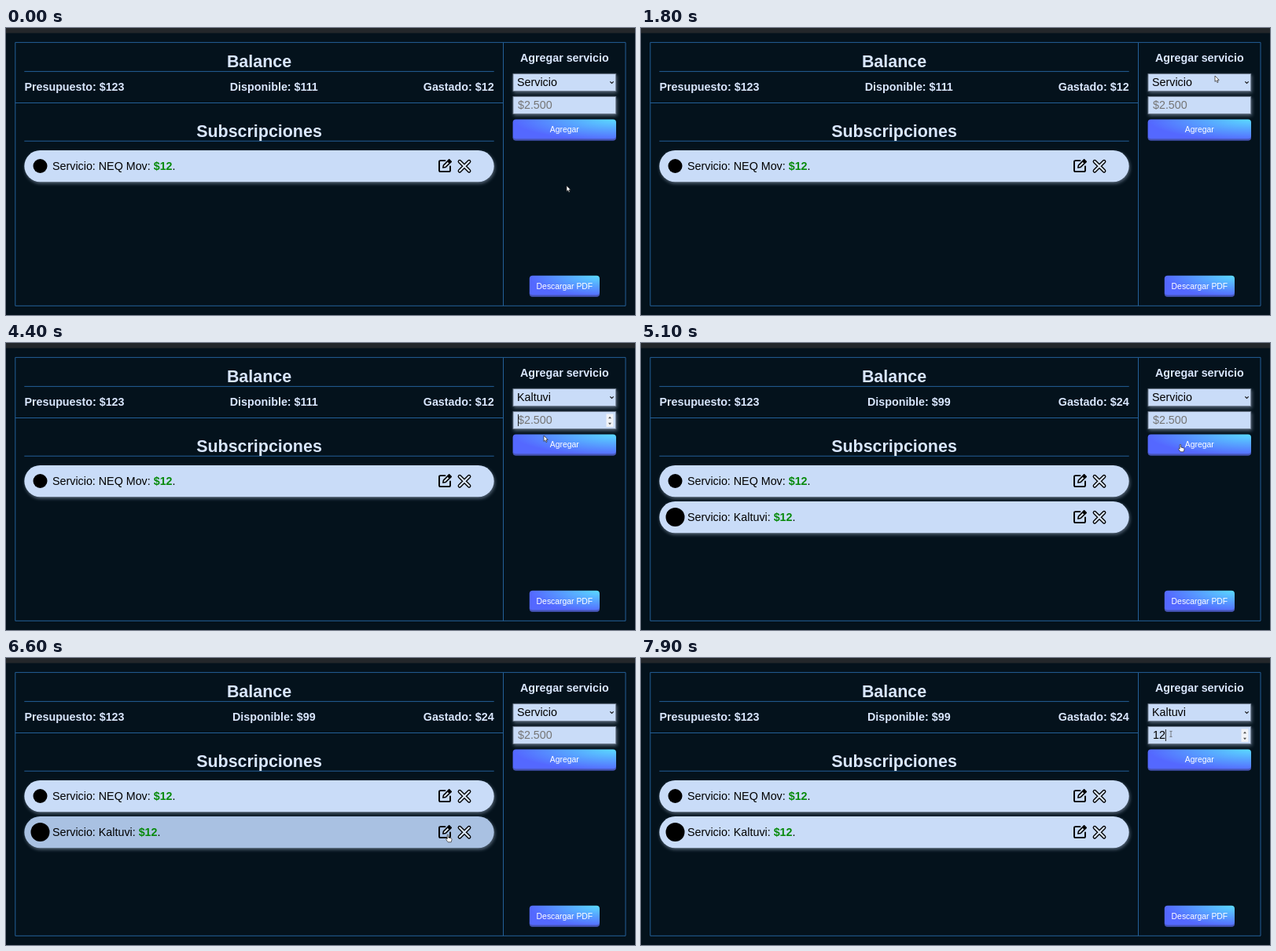
Recreate the animation shown at these times as an HTML page. Size 800 by 366 pixels, loop 8 s.

```html
<!DOCTYPE html>
<html lang="es">
<head>
<meta charset="utf-8">
<title>Subscripciones</title>
<style>
  html, body { margin: 0; width: 100%; height: 100%; overflow: hidden; background: #04121c; }
  svg { display: block; width: 800px; height: 366px; }
  text { font: 14.3px "Liberation Sans", Arial, sans-serif; white-space: pre; }
  .light { fill: #d9e6fd; font-weight: bold; }
  .title { font-size: 21.45px; text-anchor: middle; }
  .mid { text-anchor: middle; }
  .end { text-anchor: end; }
  .line { fill: none; stroke: #235f98; }
  .glow { filter: drop-shadow(1px 2px 2px rgba(201, 220, 248, .42)); }
  .price { fill: #078a0b; font-weight: bold; }
  .button text { font-size: 10.4px; fill: #fff; text-anchor: middle; }
</style>
</head>
<body>
<svg viewBox="0 0 800 366">
  <defs>
    <radialGradient id="blue" cx="1" cy="0" r="1">
      <stop stop-color="#5adaff"/><stop offset="1" stop-color="#5468ff"/>
    </radialGradient>
    <g id="edit" fill="none" stroke="#000" stroke-linecap="round" stroke-linejoin="round">
      <path d="M8.5 2.6H2.6Q1 2.6 1 4.2V15Q1 16.6 2.6 16.6H13.4Q15 16.6 15 15V10" stroke-width="1.9"/>
      <path d="M5.8 11.6L6.4 8.6L13.6 1.4L16.2 4L9 11.1Z" fill="#dbe7fa" stroke-width="1.5"/>
      <path d="M11.6 3.4L14.2 6L16.2 4L13.6 1.4Z" fill="#000" stroke-width="1.2"/>
    </g>
  </defs>
  <rect width="800" height="366" fill="#04121c"/>
  <rect width="800" height="6.5" fill="#23272b"/>
  <path class="line" d="M11.8 18.4H788V354.3H11.8ZM632.5 18.4V354.3M11.8 95.5H632.5M23.3 55.4H620.7M23.3 144.2H620.7"/>

  <text class="light title" x="322" y="49.6">Balance</text>
  <text class="light" x="23.4" y="80">Presupuesto: $123</text>
  <text class="light mid" x="340.8" y="80" id="available"></text>
  <text class="light end" x="620.6" y="80" id="spent"></text>
  <text class="light title" x="322" y="138.6">Subscripciones</text>
  <g id="rows"></g>

  <text class="light mid" x="710.3" y="42.7">Agregar servicio</text>
  <g class="glow" fill="#c9dcf8" stroke="#6f7b8d" stroke-width=".9">
    <rect x="645" y="58.4" width="130.7" height="22"/>
    <rect x="645" y="87.4" width="130.7" height="22"/>
  </g>
  <text x="650" y="74.3" id="service"></text>
  <path d="M768.3 68.3l2.2 2.2 2.2-2.2" fill="none" stroke="#111" stroke-width="1.1"/>
  <text x="651" y="103.2" id="amount"></text>
  <g id="spinner">
    <rect x="763.5" y="90.5" width="9" height="16.5" fill="#f1f3f7"/>
    <path d="M766 96.2l2-2.4 2 2.4zM766 101.8l2 2.4 2-2.4z" fill="#505050"/>
  </g>
  <path id="caret" d="M0 91V106" stroke="#111" stroke-width=".9"/>
  <g id="buttons"></g>
  <g id="cursor" stroke-linejoin="round"></g>
</svg>
<script>
const $ = id => document.getElementById(id);
const LOOP = 8000, STEP = 100;
const ADDED = 5000;

const services = [
  { name: "NEQ Mov", y: 156, mark: 9 },
  { name: "Kaltuvi", y: 202, mark: 12 },
];

$("rows").innerHTML = services.map(({ name, y, mark }) => `
  <g>
    <rect class="glow" x="23.3" y="${y}" width="597.4" height="40.2" rx="20.1"/>
    <circle cx="43.5" cy="${y + 20}" r="${mark}"/>
    <text x="59" y="${y + 24.8}">Servicio: ${name}: <tspan class="price">$12</tspan>.</text>
    <use href="#edit" x="550" y="${y + 10.5}"/>
    <g transform="translate(583 ${y + 20.3})" stroke-linecap="round">
      <path d="M-6 -6L6 6M6 -6L-6 6" stroke="#000" stroke-width="4.8"/>
      <path d="M-6 -6L6 6M6 -6L-6 6" stroke="#dbe7fa" stroke-width="2.2"/>
    </g>
  </g>`).join("");

function button(x, y, w, label) {
  const h = 27, r = 4, b = y + h, right = x + w;
  return `<g class="button">
    <rect x="${x}" y="${y}" width="${w}" height="${h}" rx="${r}" fill="url(#blue)"/>
    <path fill="#3a416f" fill-opacity=".5" d="M${x} ${b - r}a${r} ${r} 0 0 0 ${r} ${r}H${right - r}
      a${r} ${r} 0 0 0 ${r} ${-r}v-2.2a${r} ${r} 0 0 1 ${-r} ${r}H${x + r}a${r} ${r} 0 0 1 ${-r} ${-r}z"/>
    <text x="${x + w / 2}" y="${y + 16.8}">${label}</text>
  </g>`;
}
$("buttons").innerHTML = button(644.6, 116.5, 131.4, "Agregar") + button(665.8, 315.8, 89.2, "Descargar PDF");

const cursors = {
  arrow: `<path d="M0 0V7.4L1.7 5.9L2.9 8.6L4.2 8L3 5.4H5.2Z" fill="#fff" stroke="#222" stroke-width=".7"/>`,
  hand: `<path d="M-.8 .8Q0 -.6 .8 .8V4L4.2 4.9Q5.2 5.3 5 6.6L4.2 9.8H.2L-2.4 6.4Q-2.3 5 -.8 6Z"
    fill="#fff" stroke="#222" stroke-width=".7"/>`,
  beam: `<path d="M-1.6 -3.6H1.6M0 -3.6V3.4M-1.6 3.4H1.6" stroke="#555" stroke-width=".7"/>`,
};

// Pointer stops: time, x, y
const stops = [
  [0, 713, 201], [700, 713, 201], [1700, 730, 61], [2100, 730, 61],
  [2800, 697, 153], [3000, 697, 154], [3200, 692, 165], [3400, 692, 165],
  [3900, 686, 98], [4100, 686, 98], [4400, 684, 118], [4700, 686, 129], [5200, 686, 129],
  [6300, 562, 225], [6900, 562, 225], [7700, 674, 97], [8000, 674, 97],
];

function pointer(t) {
  const i = stops.findIndex(s => s[0] > t);
  const [t0, x0, y0] = stops[i - 1], [t1, x1, y1] = stops[i];
  const p = (t - t0) / (t1 - t0), e = p * p * (3 - 2 * p);
  return [x0 + (x1 - x0) * e, y0 + (y1 - y0) * e];
}

const inside = ([x, y], left, top, right, bottom) => x > left && x < right && y > top && y < bottom;
const show = (el, on) => el.setAttribute("display", on ? "inline" : "none");

function cursorKind(p, rowCount) {
  if (inside(p, 645, 87, 776, 110)) return "beam";
  const onIcon = services.slice(0, rowCount).some(({ y }) => inside(p, 549, y + 9, 592, y + 31));
  return onIcon || inside(p, 645, 120, 776, 143) ? "hand" : "arrow";
}

function formState(t) {
  const kaltuvi = services[1].name;
  if (t >= 6800) return { service: kaltuvi, amount: "12", focus: t >= 7700 };
  if (t >= 3300 && t < ADDED) {
    return { service: kaltuvi, amount: t >= 4700 ? "12" : t >= 4600 ? "1" : "", focus: t >= 4000 };
  }
  return { service: "Servicio", amount: "", focus: false };
}

function draw(t) {
  const p = pointer(t), added = t >= ADDED, rowCount = added ? 2 : 1;
  const { service, amount, focus } = formState(t);

  $("available").textContent = "Disponible: $" + (added ? 99 : 111);
  $("spent").textContent = "Gastado: $" + (added ? 24 : 12);
  [...$("rows").children].forEach((row, i) => {
    const { y } = services[i];
    show(row, i < rowCount);
    row.firstElementChild.setAttribute("fill", inside(p, 23, y, 621, y + 40) ? "#a9c1e2" : "#c9dcf8");
  });

  $("service").textContent = service;
  $("amount").textContent = amount || "$2.500";
  $("amount").setAttribute("fill", amount ? "#000" : "#757575");
  const kind = cursorKind(p, rowCount);
  show($("spinner"), focus || kind === "beam");
  show($("caret"), focus);
  $("caret").setAttribute("transform", `translate(${651.5 + amount.length * 7.95} 0)`);

  $("cursor").innerHTML = cursors[kind];
  $("cursor").setAttribute("transform", `translate(${p[0]} ${p[1]})`);
}

const start = performance.now();
function tick(now) {
  const t = Math.max(0, now - start) % LOOP;
  draw(Math.floor(t / STEP) * STEP);
  requestAnimationFrame(tick);
}
draw(0);
requestAnimationFrame(tick);
</script>
</body>
</html>
```
